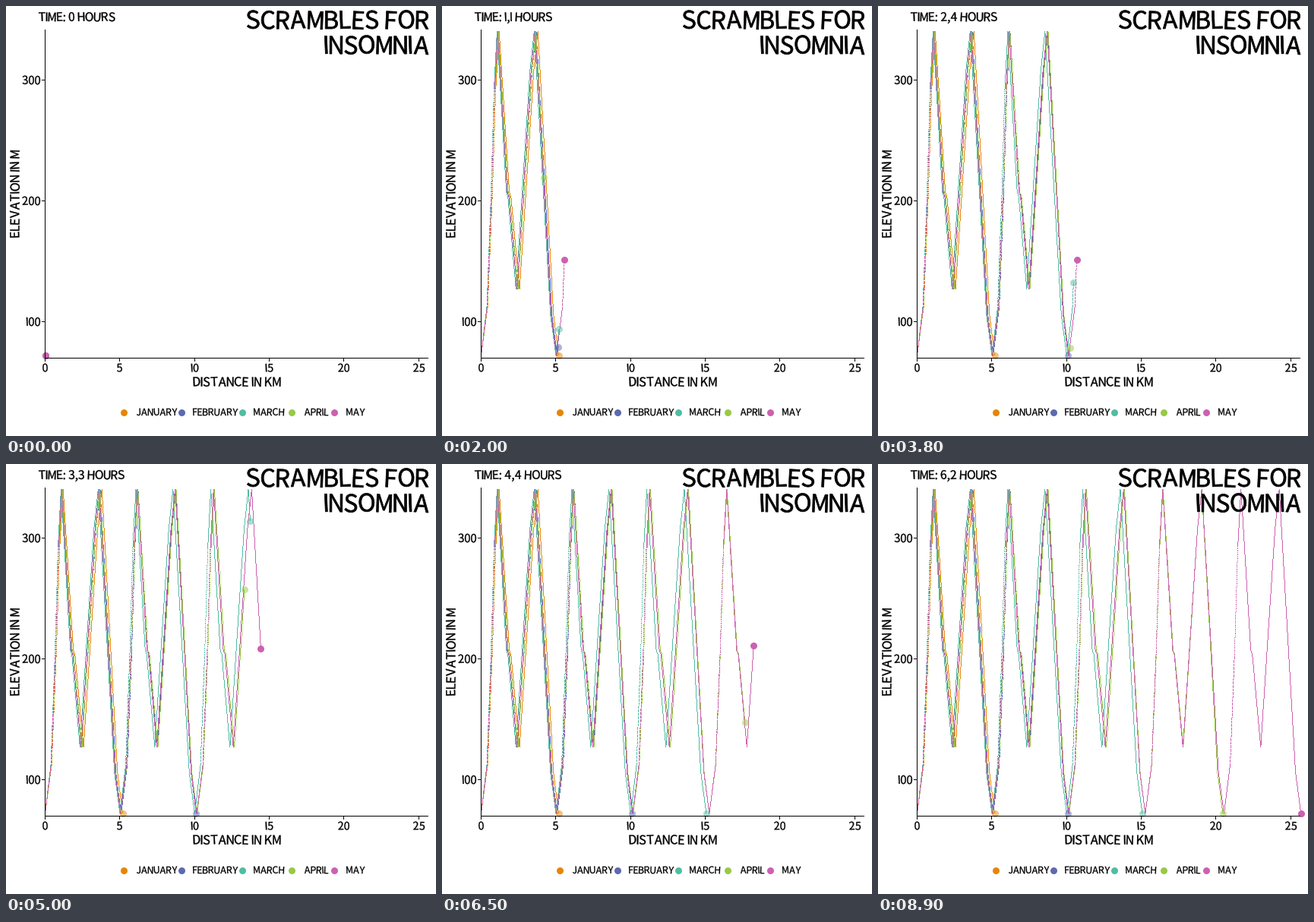
A matplotlib script that plays this animation: 566x566 px, repeating every 10 s.

```python
import numpy as np
import matplotlib.pyplot as plt
from matplotlib.animation import FuncAnimation
from matplotlib.patches import PathPatch
from matplotlib.path import Path
from matplotlib.textpath import TextPath
from matplotlib.transforms import Affine2D

SIZE, DPI = 566, 100
PX = 72 / DPI
FRAMES, START, LAST = 100, 5, 84
HOURS = 6.2
FONT = {"family": "Noto Sans CJK JP"}
CAP_HEIGHT, GAP, SPACE = .733, .085, .22

# Turning points of the hill within one lap: share of the lap, elevation in m
SHARE, HEIGHT = np.array([
    (0, 72), (.08, 112), (.137, 203), (.18, 292), (.222, 340), (.35, 207), (.37, 204),
    (.48, 127), (.665, 307), (.72, 340), (.93, 106), (1, 72)]).T

# Name, colour, legend x, drift in px, km and animation step at the end of each lap
MONTHS = [
    ("JANUARY", "#E58606", 154.5, 172, 1.6, [5.19], [11]),
    ("FEBRUARY", "#5D69B1", 230.5, 246, .5, [5.09, 10.12], [14, 31]),
    ("MARCH", "#52BCA3", 310.5, 326, -1.4, [5.01, 10.02, 15.08], [13, 29, 48.5]),
    ("APRIL", "#99C945", 375.5, 393, .9, [5.05, 10.17, 15.28, 20.47], [17, 32, 50, 67]),
    ("MAY", "#CC61B0", 431.5, 448, -.3, [5.04, 10.15, 15.28, 20.55, 25.7],
     [11, 29, 47, 66, 84]),
]


def x_px(km):
    return 51.5 + 19.66 * km


def y_px(metres):
    return 97 + (300 - metres) * 1.593


def lettering(text, x, y, cap, align=0, angle=0):
    """Slightly wobbly hand-set letters; align 0 is left, .5 centre, 1 right."""
    size = cap / CAP_HEIGHT
    glyphs, pen = [], 0
    for i, char in enumerate(text.replace("1", "I").replace(".", ",")):
        if char == " ":
            pen += SPACE * size
            continue
        glyph = TextPath((0, 0), char, size=size, prop=FONT)
        tilt = Affine2D().rotate_deg(3 * np.sin(2.3 * i + 1))
        glyph = tilt.transform_path(glyph)
        box = glyph.get_extents()
        glyphs.append(Affine2D().translate(pen - box.x0, 0).transform_path(glyph))
        pen += box.width + GAP * size
    width = pen - GAP * size
    place = Affine2D().translate(-align * width, 0).rotate_deg(angle).scale(1, -1)
    return place.translate(x, y).transform_path(Path.make_compound_path(*glyphs))


fig = plt.figure(figsize=(SIZE / DPI, SIZE / DPI), dpi=DPI, facecolor="white")
ax = fig.add_axes([0, 0, 1, 1])
ax.set(xlim=(0, SIZE), ylim=(SIZE, 0))
ax.axis("off")


def write(text, x, y, cap, **layout):
    edge = .022 * cap / CAP_HEIGHT * PX
    return ax.add_patch(PathPatch(lettering(text, x, y, cap, **layout), color="black",
                                  lw=edge, joinstyle="round", zorder=9))


def pen_line(xs, ys, color="black", zorder=8):
    """Line one pixel wide, meant for points on pixel centres."""
    return ax.plot(xs, ys, color=color, lw=PX, zorder=zorder, snap=False,
                   solid_capstyle="butt")[0]


def dot(x, y, color, alpha=1):
    return ax.plot([x], [y], "o", ms=9 * PX, mew=0, color=color, alpha=alpha,
                   zorder=5, snap=False)[0]


def position(laps, ends, drift):
    """Pixel position after a number of laps; drift bends a lap sideways."""
    share = laps % 1
    km = np.interp(laps, np.arange(len(ends) + 1), [0, *ends])
    return (x_px(km) + drift * np.sin(np.pi * share),
            y_px(np.interp(share, SHARE, HEIGHT)))


def laps_run(step, steps):
    """Each lap starts slowly uphill and gains speed."""
    laps = np.interp(step, [0, *steps], np.arange(len(steps) + 1))
    return laps // 1 + (laps % 1) ** 1.5


def pixel_trail(ends, drift):
    """Upright one-pixel dashes along the run, one for each row crossed."""
    laps = np.linspace(0, len(ends), 2000 * len(ends))
    x, y = position(laps, ends, drift)
    row = np.floor(y)
    keep = np.append(True, np.diff(row) != 0)
    col, row = np.floor(x[keep]) + .5, row[keep]
    gap = np.full_like(row, np.nan)
    return (laps[keep], np.column_stack([col, col, gap]),
            np.column_stack([row, row + 1, gap]))


pen_line([51.5, 51.5], [31, 464])
pen_line([51, 556], [463.5, 463.5])
for km in range(0, 26, 5):
    x = np.floor(x_px(km)) + .5
    pen_line([x, x], [464, 468])
    write(str(km), x, 481.5, 10.5, align=.5)
for metres in (100, 200, 300):
    y = np.floor(y_px(metres)) + .5
    pen_line([47, 51], [y, y])
    write(str(metres), 45, y + 5.5, 11, align=1)

write("DISTANCE IN KM", 304, 500.5, 12, align=.5)
write("ELEVATION IN M", 17.5, 247.5, 12, align=.5, angle=90)
write("SCRAMBLES FOR", 556, 30, 23.5, align=1)
write("INSOMNIA", 556, 63, 23.5, align=1)
clock = write("TIME: 0 HOURS", 43, 20, 11.5)

runners = []
for name, color, dot_x, text_x, drift, ends, steps in MONTHS:
    dot(dot_x, 534.5, color)
    write(name, text_x, 539, 9.2)
    line = pen_line([], [], color, zorder=3)
    marker = dot(51.5, y_px(72), color, 1 if name == "MAY" else .5)
    runners.append((line, marker, drift, ends, steps, pixel_trail(ends, drift)))


def draw(frame):
    step = min(max(frame - START, 0), LAST)
    hours = round(HOURS * step / LAST, 1)
    clock.set_path(lettering(f"TIME: {hours:g} HOURS", 43, 20, 11.5))
    for line, marker, drift, ends, steps, (trail, cols, rows) in runners:
        laps = laps_run(step, steps)
        x, y = position(laps, ends, drift)
        done = np.searchsorted(trail, laps)
        line.set_data(cols[:done].ravel(), rows[:done].ravel())
        marker.set_data([x], [y])
    return [clock] + [artist for runner in runners for artist in runner[:2]]


anim = FuncAnimation(fig, draw, frames=FRAMES, interval=100, repeat=True, repeat_delay=0)
plt.show()
```
